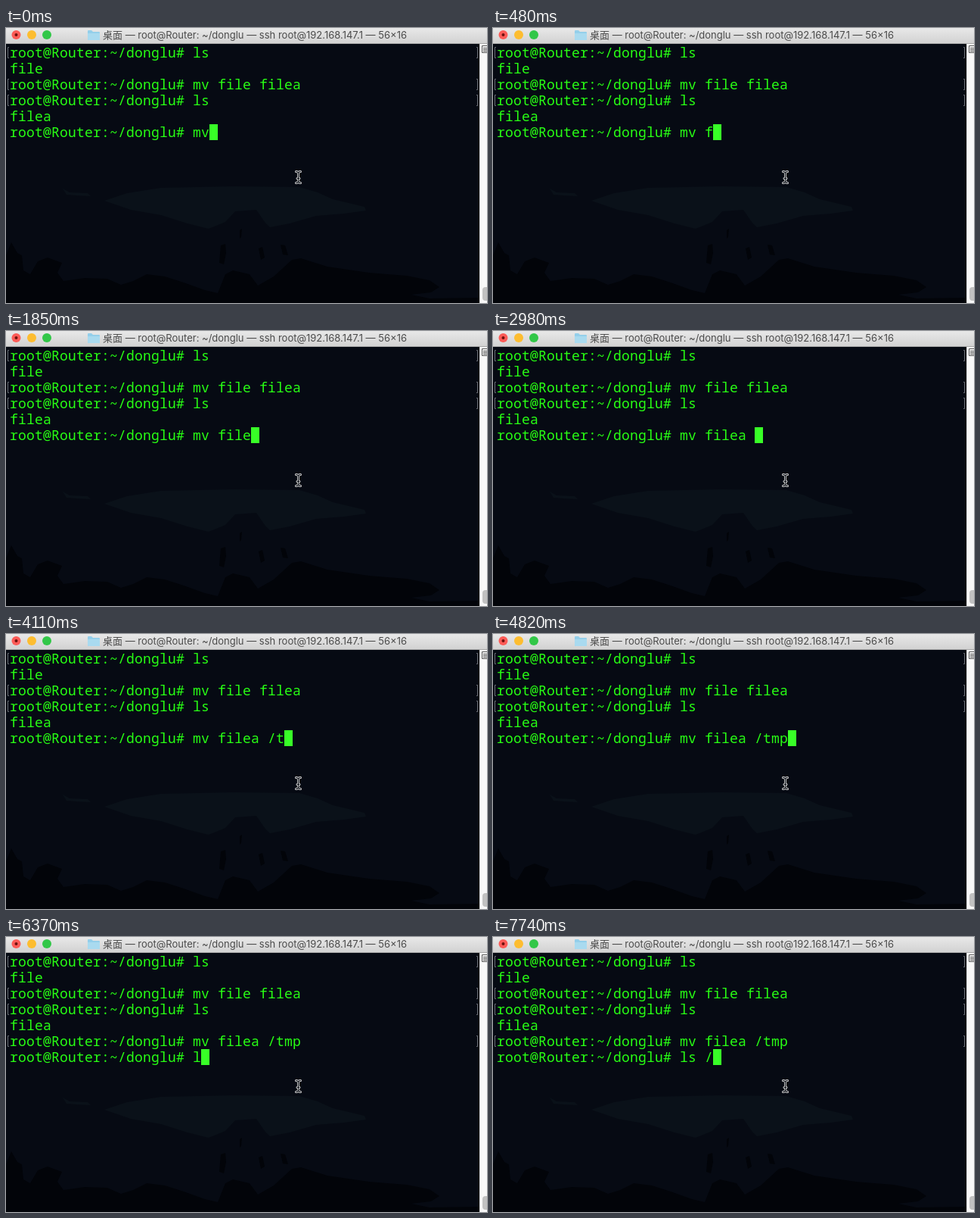
An HTML page that plays this animation: 636 by 363 pixels, repeating every 8 s.

```html
<!DOCTYPE html>
<html lang="zh">
<head>
<meta charset="utf-8">
<style>
  html, body { margin: 0; width: 100%; height: 100%; overflow: hidden; background: #060a13; }
  svg { display: block; }
  .title { font: 13px Inter, "Noto Sans CJK SC", "Noto Sans CJK", sans-serif; fill: #4b4b4b; }
  .line { font: 500 18px "Noto Sans Mono", monospace; letter-spacing: .2px; fill: #28fe14; white-space: pre; }
  .bracket { fill: none; stroke: #6a6f76; }
</style>
</head>
<body>
<svg width="636" height="363" viewBox="0 0 636 363">
  <defs>
    <linearGradient id="bar" x2="0" y2="1">
      <stop stop-color="#e8e8e8"/><stop offset="1" stop-color="#d2d2d2"/>
    </linearGradient>
    <path id="beam" d="M383.5 189.5Q386.5 189.5 386.5 192V202Q386.5 204.5 383.5 204.5M389.5 189.5Q386.5 189.5 386.5 192M386.5 202Q386.5 204.5 389.5 204.5M385 198.5H388"/>
  </defs>

  <!-- wallpaper -->
  <rect width="636" height="363" fill="#060a13"/>
  <g fill="#0a1119">
    <path d="M130 228L160 218 205 211 300 209 388 210 412 217 432 226 474 236 476 241 447 245 410 248 375 258 349 263 342 256 331 240 303 242 290 256 268 265 240 258 205 247 165 240Z"/>
    <path d="M75 212L84 217 108 218 112 222 92 221 80 220Z"/>
  </g>
  <g fill="#020409">
    <path d="M0 300L7 283 15 297 21 300 23 320 32 325 42 308 55 303 74 310 68 323 76 334 104 330 134 331 152 339 168 334 186 325 210 328 235 336 263 346 280 350 290 325 300 320 322 325 333 340 354 328 378 306 390 304 425 315 480 323 530 327 560 333 573 342 562 349 536 352 560 357 626 356V363H0Z"/>
    <path d="M284 287L290 285 291 297 288 312 282 310Z"/>
    <path d="M334 291L339 289 342 303 337 306Z"/>
    <path d="M363 286L369 287 373 300 366 299Z"/>
    <path d="M309 267L312 265 311 276 309 278Z"/>
  </g>

  <!-- window frame -->
  <rect width="636" height="20" fill="url(#bar)"/>
  <path d="M0 20.5H636" stroke="#a9a9a9"/>
  <circle cx="13.5" cy="9" r="6" fill="#fc5b57"/>
  <circle cx="13.5" cy="9" r="2" fill="#6d110e"/>
  <circle cx="34" cy="9" r="6" fill="#fdbd30"/>
  <circle cx="54" cy="9" r="6" fill="#32c748"/>
  <path d="M108 4q0-1 1-1h4l2 2h8q1 0 1 1v9q0 1-1 1h-14q-1 0-1-1Z" fill="#94cfea"/>
  <path d="M108 7h16v8q0 1-1 1h-14q-1 0-1-1Z" fill="#a9daef"/>
  <text class="title" x="329" y="14" text-anchor="middle">桌面 — root@Router: ~/donglu — ssh root@192.168.147.1 — 56×16</text>
  <rect x="626" y="21" width="10" height="342" fill="#f8f8f8"/>
  <path d="M626.5 21V363" stroke="#dedede"/>
  <path d="M636 23.5H629.5V32.5H636M631 26.5H636M631 28.5H636M631 30.5H636" fill="none" stroke="#555"/>
  <rect x="630" y="342" width="12" height="18" rx="4" fill="#c1c1c1"/>

  <g id="screen"></g>
  <rect id="caret" width="11" height="21" fill="#38fe27"/>

  <!-- mouse pointer -->
  <g fill="none" stroke-linecap="round">
    <use href="#beam" stroke="#d8d8d8" stroke-width="3"/>
    <use href="#beam" stroke="#10141b" stroke-width="1.2"/>
  </g>
</svg>
<script>
const LOOP = 8000, LEFT = 5, TOP = 22, COL = 11, ROW = 21;
const PROMPT = 'root@Router:~/donglu# ';
const HISTORY = ['ls', null, 'mv file filea', 'ls', null];
const OUTPUT = { 1: 'file', 4: 'filea' };
const ENTER = 5780, NEXT_PROMPT = 5840;
// '<' is a backspace
const KEYS = [[60, ' '], [480, 'f'], [650, 'i'], [1310, '<'], [1550, 'i'], [1730, 'l'],
  [1850, 'e'], [2450, 'a'], [2980, ' '], [3640, '/'], [4110, 't'], [4530, 'm'], [4820, 'p']];
const NEXT_KEYS = [[6370, 'l'], [6970, 's'], [7270, ' '], [7740, '/']];

const screen = document.getElementById('screen');
const caret = document.getElementById('caret');

function add(name, attrs) {
  const el = document.createElementNS('http://www.w3.org/2000/svg', name);
  for (const key in attrs) el.setAttribute(key, attrs[key]);
  return screen.appendChild(el);
}

function addLine(row, text = '') {
  const el = add('text', { class: 'line', x: LEFT, y: TOP + row * ROW + 17 });
  el.textContent = text;
  return el;
}

function addBrackets(row) {
  const y = TOP + row * ROW + 3.5;
  return add('path', { class: 'bracket', d: `M4 ${y}H2.5v14H4M622 ${y}h1.5v14H622` });
}

function typed(start, keys, t) {
  return keys.filter(([at]) => at <= t)
    .reduce((text, [, key]) => key === '<' ? text.slice(0, -1) : text + key, start);
}

HISTORY.forEach((command, row) => {
  addLine(row, command ? PROMPT + command : OUTPUT[row]);
  if (command) addBrackets(row);
});
const current = addLine(5), next = addLine(6), entered = addBrackets(5);

function render(t) {
  const first = typed(PROMPT + 'mv', KEYS, t);
  const second = t < NEXT_PROMPT ? '' : typed(PROMPT, NEXT_KEYS, t);
  current.textContent = first;
  next.textContent = second;
  entered.style.display = t < ENTER ? 'none' : '';
  caret.style.display = t >= ENTER && t < NEXT_PROMPT ? 'none' : '';
  caret.setAttribute('x', LEFT + (second || first).length * COL);
  caret.setAttribute('y', TOP + (second ? 6 : 5) * ROW);
}

function frame() {
  render(performance.now() % LOOP);
  requestAnimationFrame(frame);
}
frame();
</script>
</body>
</html>
```
